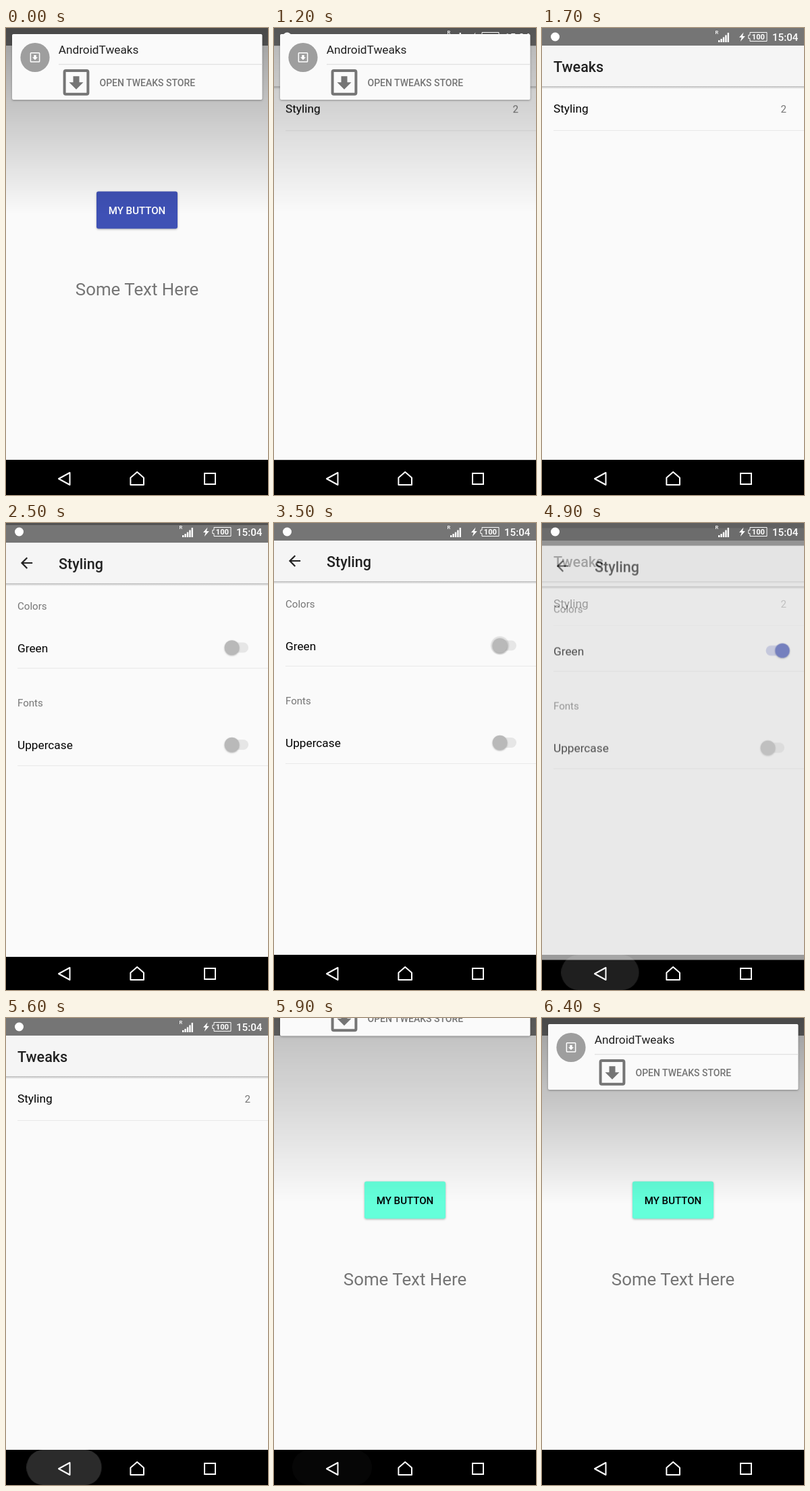
Write an HTML page that moves like this. It is 388 px wide and 690 px high and loops after 8 s.

```html
<!DOCTYPE html>
<html lang="en">
<head>
<meta charset="utf-8">
<title>Tweaks demo</title>
<style>
  html, body { margin: 0; width: 100%; height: 100%; overflow: hidden; background: #000; }
  svg { display: block; width: 388px; height: 690px; }
  text { font-family: Roboto, "Noto Sans", sans-serif; }
  .title { font-size: 21.55px; font-weight: 500; fill: #212121; }
  .row { font-size: 17.24px; fill: #000; }
  .small { font-size: 15.09px; fill: #757575; }
  .caps { font-size: 14px; font-weight: 500; fill: #757575; }
  .label { font-size: 15.09px; font-weight: 500; }
  .big { font-size: 25.87px; fill: #757575; }
  .line { stroke: #e9e9e9; fill: none; }
  .thumb { filter: drop-shadow(0 1px 1px rgba(0, 0, 0, .3)); }

  .anim { animation: 8s linear infinite; }
  #main { animation-name: main; }
  #button { animation-name: button; }
  #button-label { animation-name: button-label; }
  #tweaks { animation-name: tweaks; }
  #tweaks-body { animation-name: dim; }
  #styling { animation-name: styling; }
  #knob { animation-name: knob; }
  #thumb { animation-name: thumb; }
  #track { animation-name: track; }
  #touch { animation-name: touch; transform-box: fill-box; transform-origin: center; }
  #scrim { animation-name: scrim; }
  #icons { animation-name: icons; }
  #card { animation-name: card; }
  #press { animation-name: press; }

  @keyframes main {
    0%, 12% { filter: brightness(1); }
    14.5% { filter: brightness(.7); }
    70.25% { filter: brightness(.7); animation-timing-function: cubic-bezier(.11, 0, .5, 0); }
    73.4%, 100% { filter: brightness(1); }
  }
  @keyframes button { 0%, 50% { fill: #3f51b5; } 50.01%, 100% { fill: #64ffda; } }
  @keyframes button-label { 0%, 50% { fill: #fff; } 50.01%, 100% { fill: #000; } }
  @keyframes tweaks {
    0%, 12% { opacity: 0; transform: translateY(55px); animation-timing-function: cubic-bezier(.22, 1, .36, 1); }
    14.5% { opacity: 1; }
    16% { transform: none; }
    70.25% { transform: none; animation-timing-function: cubic-bezier(.5, 0, .75, 0); }
    71.5% { opacity: 1; }
    73.4%, 100% { opacity: 0; transform: translateY(55px); }
  }
  @keyframes dim {
    0%, 30% { filter: brightness(1); }
    31.25% { filter: brightness(.7); }
    59.25% { filter: brightness(.7); animation-timing-function: cubic-bezier(.11, 0, .5, 0); }
    62.4%, 100% { filter: brightness(1); }
  }
  @keyframes styling {
    0%, 30.125% { opacity: 0; transform: translateY(55px); animation-timing-function: cubic-bezier(.22, 1, .36, 1); }
    31.2% { opacity: 1; }
    32.6% { transform: none; }
    59.35% { transform: none; animation-timing-function: cubic-bezier(.5, 0, .75, 0); }
    60.5% { opacity: 1; }
    62.475%, 100% { opacity: 0; transform: translateY(55px); }
  }
  @keyframes knob {
    0%, 43.75% { transform: none; animation-timing-function: cubic-bezier(.4, 0, .2, 1); }
    46.5%, 100% { transform: translateX(21.5px); }
  }
  @keyframes thumb { 0%, 43.75% { fill: #b9b9b9; } 46.5%, 100% { fill: #3f51b5; } }
  @keyframes track { 0%, 43.75% { fill: #e6e6e6; } 46.5%, 100% { fill: #c1c5e6; } }
  @keyframes touch {
    0%, 42.2% { opacity: 0; transform: scale(.4); }
    43.75% { opacity: .1; }
    45.5% { opacity: .1; transform: none; }
    50%, 100% { opacity: 0; transform: none; }
  }
  @keyframes scrim { 0%, 13.5% { opacity: 1; } 18.75%, 71.25% { opacity: 0; } 75%, 100% { opacity: 1; } }
  @keyframes icons { 0%, 14% { opacity: 0; } 15%, 71.25% { opacity: 1; } 73%, 100% { opacity: 0; } }
  @keyframes card {
    0%, 15% { transform: none; animation-timing-function: ease-in; }
    18.75% { transform: translateY(-112px); }
    71.25% { transform: translateY(-112px); animation-timing-function: cubic-bezier(.9, 0, .8, 1); }
    75.3% { transform: translateY(12px); animation-timing-function: cubic-bezier(.4, 0, .2, 1); }
    77.75% { transform: translateY(2px); animation-timing-function: cubic-bezier(.4, 0, .2, 1); }
    79.4%, 100% { transform: none; }
  }
  @keyframes press {
    0%, 58.74%, 68.74% { opacity: 0; }
    58.75%, 68.75% { opacity: .17; transform: scaleX(.9); animation-timing-function: ease-out; }
    60%, 70% { opacity: .17; }
    63.1%, 73.1% { transform: none; }
    64.4%, 74.4%, 100% { opacity: 0; transform: none; }
  }
</style>
</head>
<body>
<svg viewBox="0 0 388 690" width="388" height="690">
  <defs>
    <linearGradient id="shade" x2="0" y2="1">
      <stop stop-opacity=".37"/>
      <stop offset="1" stop-opacity="0"/>
    </linearGradient>
    <linearGradient id="edge" x2="0" y2="1">
      <stop stop-opacity=".26"/>
      <stop offset="1" stop-opacity="0"/>
    </linearGradient>
    <g id="window">
      <rect width="388" height="690"/>
      <rect width="388" height="26" fill="#757575"/>
      <rect y="26" width="388" height="612" fill="#fafafa"/>
    </g>
    <g id="bar">
      <rect y="26" width="388" height="60" fill="#f5f5f5"/>
      <rect y="86" width="388" height="4" fill="url(#edge)"/>
    </g>
    <g id="download">
      <rect x="-17.4" y="-17.4" width="34.8" height="34.8" rx="2" fill="none" stroke="currentColor" stroke-width="4"/>
      <path d="M-4.5-9h9v9h6L0 10.5-10.5 0h6z" fill="currentColor"/>
    </g>
  </defs>

  <g id="main" class="anim">
    <use href="#window"/>
    <rect id="button" class="anim" x="134" y="241.5" width="120" height="55" rx="3" style="filter:drop-shadow(0 1.5px 1.5px rgba(0,0,0,.3))"/>
    <text id="button-label" class="anim label" x="194" y="275" text-anchor="middle">MY BUTTON</text>
    <text class="big" x="194" y="395.3" text-anchor="middle">Some Text Here</text>
  </g>

  <g id="tweaks" class="anim">
    <g id="tweaks-body" class="anim">
      <use href="#window"/>
      <use href="#bar"/>
      <text class="title" x="17" y="65">Tweaks</text>
      <text class="row" x="17" y="125">Styling</text>
      <text class="small" x="362" y="125" text-anchor="end">2</text>
      <path class="line" d="M17 151.5h371"/>
    </g>
  </g>

  <g id="styling" class="anim">
    <use href="#window"/>
    <use href="#bar"/>
    <path d="M20 11H7.83l5.59-5.59L12 4l-8 8 8 8 1.41-1.41L7.83 13H20z" transform="translate(17.6 43.1) scale(1.078)" fill="#212121"/>
    <text class="title" x="78" y="65">Styling</text>
    <text class="small" x="17" y="124.5">Colors</text>
    <text class="row" x="17" y="187.5">Green</text>
    <text class="small" x="17" y="268">Fonts</text>
    <text class="row" x="17" y="331">Uppercase</text>
    <path class="line" d="M17 211.5h371M17 355.5h371"/>
    <rect id="track" class="anim" x="331.5" y="173.5" width="27.5" height="15" rx="7.5"/>
    <g id="knob" class="anim">
      <circle id="touch" class="anim" cx="334.5" cy="181" r="20"/>
      <circle id="thumb" class="anim thumb" cx="334.5" cy="181" r="10.8"/>
    </g>
    <rect x="331.5" y="317" width="27.5" height="15" rx="7.5" fill="#e6e6e6"/>
    <circle class="thumb" cx="334.5" cy="324.5" r="10.8" fill="#b9b9b9"/>
  </g>

  <rect id="scrim" class="anim" width="388" height="275" fill="url(#shade)"/>

  <g id="icons" class="anim" fill="#fff">
    <circle cx="19.5" cy="13" r="6.5"/>
    <text x="256.5" y="8.5" font-size="7.5" font-weight="500">R</text>
    <path d="M261 18h2.4v3H261zM264.4 16h2.4v5h-2.4zM267.8 13.5h2.4V21h-2.4zM271.2 10.5h2.4V21h-2.4zM274.6 7h2.4v14h-2.4z"/>
    <path d="M298.5 6.5l-6.5 7.5h3.6l-1.8 6 7-8h-3.8z"/>
    <path d="M308 6.5h25v13h-25v-4h-2.2v-5h2.2z" fill="none" stroke="#fff"/>
    <text x="320.4" y="17" font-size="11.2" font-weight="700" text-anchor="middle">100</text>
    <text class="label" x="341" y="19">15:04</text>
  </g>

  <g id="card" class="anim">
    <rect x="9" y="9" width="370.5" height="97" rx="2" fill="#fafafa" style="filter:drop-shadow(0 1px 1.5px rgba(0,0,0,.33))"/>
    <circle cx="43" cy="43.5" r="21.6" fill="#9e9e9e"/>
    <use href="#download" transform="translate(43 43.3) scale(.38)" color="#fff"/>
    <text class="row" x="77.7" y="38" style="fill:#212121">AndroidTweaks</text>
    <path d="M78 53.8h301.5" stroke="#d9d9d9"/>
    <use href="#download" transform="translate(104 80.3)" color="#757575"/>
    <text class="caps" x="138.5" y="85.7">OPEN TWEAKS STORE</text>
  </g>

  <g transform="translate(86 0)">
    <rect id="press" class="anim" x="-59" y="638" width="118" height="52" rx="26" fill="#fff"/>
  </g>
  <g fill="none" stroke="#fff" stroke-width="2" stroke-linejoin="round">
    <path d="M78 666l16.5-9v18z"/>
    <path d="M194.2 656l9.8 8.5V675h-19.6v-10.5z"/>
    <path d="M294 658h16v16h-16z" stroke-linejoin="miter"/>
  </g>
</svg>
<script>
  // Drive the keyframes at ten pictures a second.
  const LOOP = 8000, STEP = 100;
  const anims = document.getAnimations();
  anims.forEach(a => a.pause());

  function tick() {
    const t = Math.floor(performance.now() % LOOP / STEP) * STEP;
    for (const a of anims) a.currentTime = t;
    requestAnimationFrame(tick);
  }
  tick();
</script>
</body>
</html>
```
